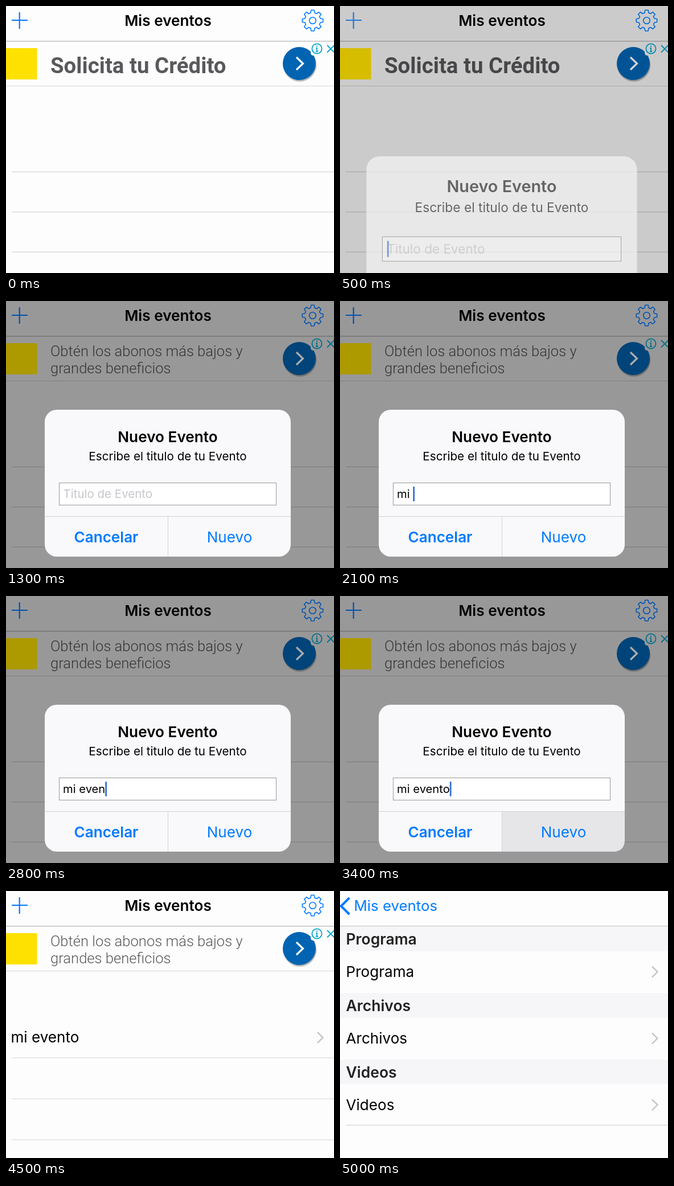
Write an HTML page that moves like this. It is 576 px wide and 469 px high and loops after 5.1 s.

```html
<!DOCTYPE html>
<html lang="es">
<head>
<meta charset="utf-8">
<title>Mis eventos</title>
<style>
html, body { margin: 0; width: 100%; height: 100%; overflow: hidden; background: #fefdfe; }
svg { display: block; width: 576px; height: 469px; font: 26.1px Inter, "Liberation Sans", sans-serif; font-optical-sizing: none; }
text { white-space: pre; }
.bold { font-weight: 600; }
.mid { text-anchor: middle; }
.blue { fill: #007aff; }
.ad { font-family: Roboto, sans-serif; }
.line { stroke: #d3d3d7; stroke-width: 1.2; }
.open { fill: none; }
.more { fill: none; stroke: #c7c7cc; stroke-width: 2.6; }
</style>
</head>
<body>
<svg viewBox="0 0 576 469">
  <rect width="576" height="469" fill="#fefdfe"/>
  <g id="list">
    <rect width="576" height="469" fill="#fefdfe"/>
    <g id="lines" class="line"></g>
    <g id="row">
      <rect id="rowTap" y="222" width="576" height="71" fill="#d9d9d9"/>
      <text x="8.5" y="266">mi evento</text>
      <path class="more" d="M547 248l9.5 9.5l-9.5 9.5"/>
    </g>
    <path class="line" d="M0 140.5H576"/>
    <text id="adTitle" class="ad" x="78" y="117.5" font-size="38.4" font-weight="700" fill="#59595b">Solicita tu Crédito</text>
    <g id="adText" class="ad" font-size="25.6" font-weight="300" fill="#58585a">
      <text x="78" y="97">Obtén los abonos más bajos y</text>
      <text x="78" y="127">grandes beneficios</text>
    </g>
  </g>
  <rect width="576" height="61" fill="#fefdfe"/>
  <path d="M0 61.8H576" stroke="#b4b4b6" stroke-width="1.3"/>
  <text id="title" class="bold mid" x="284.5" y="35" font-size="26.2">Mis eventos</text>
  <rect id="dim" width="576" height="469"/>
  <g id="adMarks">
    <rect id="tile" y="74" width="54.5" height="55"/>
    <circle cx="516" cy="104" r="29.5" opacity=".12"/>
    <circle cx="516" cy="103" r="29" opacity=".2"/>
    <circle id="disc" cx="515" cy="101" r="29"/>
    <path id="arrow" class="open" d="M510 90l11.5 11l-11.5 11" stroke-width="3.2"/>
    <path id="corner" d="M576 64H535V82Q535 87 540 87H576Z"/>
    <g id="info" class="open" stroke-width="1.8">
      <circle cx="546" cy="75" r="8.6"/>
      <path d="M546 69.4v2.3M544.2 73.8h1.8v6M543.8 79.9h4.6M564 69l12.5 12.5M576.5 69l-12.5 12.5"/>
    </g>
  </g>
  <g id="icons" class="open">
    <path id="plus" d="M10 25H38M23.7 11V40" stroke-width="2.2"/>
    <path id="gear" stroke-width="1.6"/>
    <circle cx="538.5" cy="25.5" r="5.8" stroke-width="1.6"/>
  </g>
  <g id="detail"><rect y="62.5" width="576" height="407" fill="#fefdfe"/></g>
  <g id="back">
    <path id="backArrow" class="open" d="M16.5 12L1.8 26.5L16.5 41" stroke="#007aff" stroke-width="4"/>
    <text id="backText" class="blue" x="24.5" y="35" font-size="25.8">Mis eventos</text>
  </g>
  <g id="alert">
    <rect x="68" y="191" width="432" height="258" rx="21" fill="#f9f8fa"/>
    <path id="press" d="M284.5 378.5H500V428Q500 449 479 449H284.5Z" fill="#e6e6e9"/>
    <path d="M68 378.5H500M284.5 378.5V449" stroke="#d3d3d7"/>
    <rect x="93.5" y="319.5" width="381" height="39" fill="#fff" stroke="#989899"/>
    <g id="labels">
      <text class="bold mid" x="284" y="248" font-size="26.2">Nuevo Evento</text>
      <text class="mid" x="284" y="280" font-size="20.65">Escribe el titulo de tu Evento</text>
      <text id="hint" x="100.5" y="346" font-size="20.5" fill="#c7c7cc">Titulo de Evento</text>
      <text id="typed" x="100" y="346" font-size="20.2"></text>
      <rect id="caret" y="326" width="2.8" height="26" rx="1" fill="#3570d0"/>
      <text class="bold mid blue" x="176" y="423.5">Cancelar</text>
      <text class="mid blue" x="392.5" y="423.5">Nuevo</text>
    </g>
  </g>
</svg>
<script>
const LOOP = 5100, STEP = 100;
const $ = id => document.getElementById(id);
const set = (id, attrs) => { for (const k in attrs) $(id).setAttribute(k, attrs[k]); };
const show = (id, alpha) => set(id, { opacity: alpha });
const move = (id, x) => set(id, { transform: `translate(${x} 0)` });
const ramp = (t, a, b) => Math.min(1, Math.max(0, (t - a) / (b - a)));
const smooth = (t, a, b) => { const u = ramp(t, a, b); return u * u * (3 - 2 * u); };
const lerp = (a, b, u) => a + (b - a) * u;
const shade = (rgb, k) => `rgb(${rgb.map(v => Math.round(v * (1 - k)))})`;

const PHRASE = 'mi evento';
const KEYS = [1900, 2000, 2100, 2300, 2500, 2700, 2800, 3000, 3100];

function buildGear() {
  const pts = [];
  for (let i = 0; i < 8; i++) {
    for (const [off, r] of [[-.25, 14], [-.15, 18.4], [.15, 18.4], [.25, 14]]) {
      const a = i * Math.PI / 4 + off - Math.PI / 2;
      pts.push((538.5 + r * Math.cos(a)).toFixed(1) + ' ' + (25.5 + r * Math.sin(a)).toFixed(1));
    }
  }
  set('gear', { d: 'M' + pts.join('L') + 'Z', 'stroke-linejoin': 'round' });
}

function buildDetail() {
  $('detail').innerHTML += ['Programa', 'Archivos', 'Videos'].map((name, i) => {
    const y = 62.5 + i * 116.8;
    return `<rect y="${y}" width="576" height="43.5" fill="#f6f5f8"/>
      <text class="bold" x="10.5" y="${y + 31.5}" font-size="26.5" fill="#222">${name}</text>
      <text x="10.5" y="${y + 88.5}">${name}</text>
      <path class="more" d="M548 ${y + 70}l9.5 9.5l-9.5 9.5"/>`;
  }).join('') + '<path class="line" d="M11 411.3H576"/>';
}

function drawLines(u) {
  $('lines').innerHTML = [0, 1, 2].map(i => {
    const y = lerp(291.4 + i * 70.4, 293 + i * 72, u);
    return `<path d="M10 ${y}H576"/>`;
  }).join('');
}

function drawAlert(t, inn, out) {
  const scale = lerp(1.2, 1, inn), cy = lerp(492, 320, inn);
  set('alert', {
    opacity: smooth(t, 300, 630) * (1 - out),
    transform: `translate(284 ${cy}) scale(${scale}) translate(-284 -320)`
  });
  show('labels', lerp(.6, 1, inn));
  const text = PHRASE.slice(0, KEYS.filter(k => k <= t).length);
  $('typed').textContent = text;
  show('hint', text ? 0 : 1);
  const width = text ? $('typed').getComputedTextLength() : 1;
  const blink = t >= 1300 && t < 1600 ? 0 : 1;
  set('caret', { x: 100 + width, opacity: blink });
  show('press', t >= 3400 ? 1 : 0);
}

// Saturated parts darken a little less than the white page.
function drawColours(dim, t) {
  const k = dim * .8;
  show('dim', dim);
  set('tile', { fill: shade([255, 225, 0], k) });
  set('disc', { fill: shade([0, 100, 178], k) });
  set('arrow', { stroke: shade([255, 255, 255], k) });
  set('corner', { fill: shade([254, 253, 254], dim) });
  set('info', { stroke: shade([0, 165, 205], k) });
  set('icons', { stroke: shade([0, 122, 255], k) });
  show('plus', t >= 100 && t < 600 ? lerp(.3, 1, ramp(t, 200, 600)) : 1);
}

function drawPush(t) {
  const p = 1 - Math.pow(1 - ramp(t, 4600, 5000), 2.2);
  for (const id of ['list', 'adMarks']) move(id, -173 * p);
  move('detail', 576 * (1 - p));
  move('title', -187 * p);
  show('title', 1 - ramp(p, 0, .8));
  show('icons', 1 - ramp(p, 0, .8));
  show('back', ramp(p, .2, 1));
  move('backText', 187 * (1 - p));
  show('rowTap', t >= 4600 ? 1 : 0);
}

function draw(t) {
  const inn = smooth(t, 300, 700), out = smooth(t, 3400, 3900);
  const added = ramp(t, 3900, 4200);
  drawLines(added);
  show('row', added);
  show('adTitle', 1 - ramp(t, 800, 1100));
  show('adText', ramp(t, 900, 1200));
  drawColours(.4 * inn * (1 - out), t);
  drawAlert(t, inn, out);
  drawPush(t);
}

let last = -1;
function tick() {
  const t = Math.floor(performance.now() % LOOP / STEP) * STEP;
  if (t !== last) draw(last = t);
  requestAnimationFrame(tick);
}

buildGear();
buildDetail();
tick();
</script>
</body>
</html>
```
